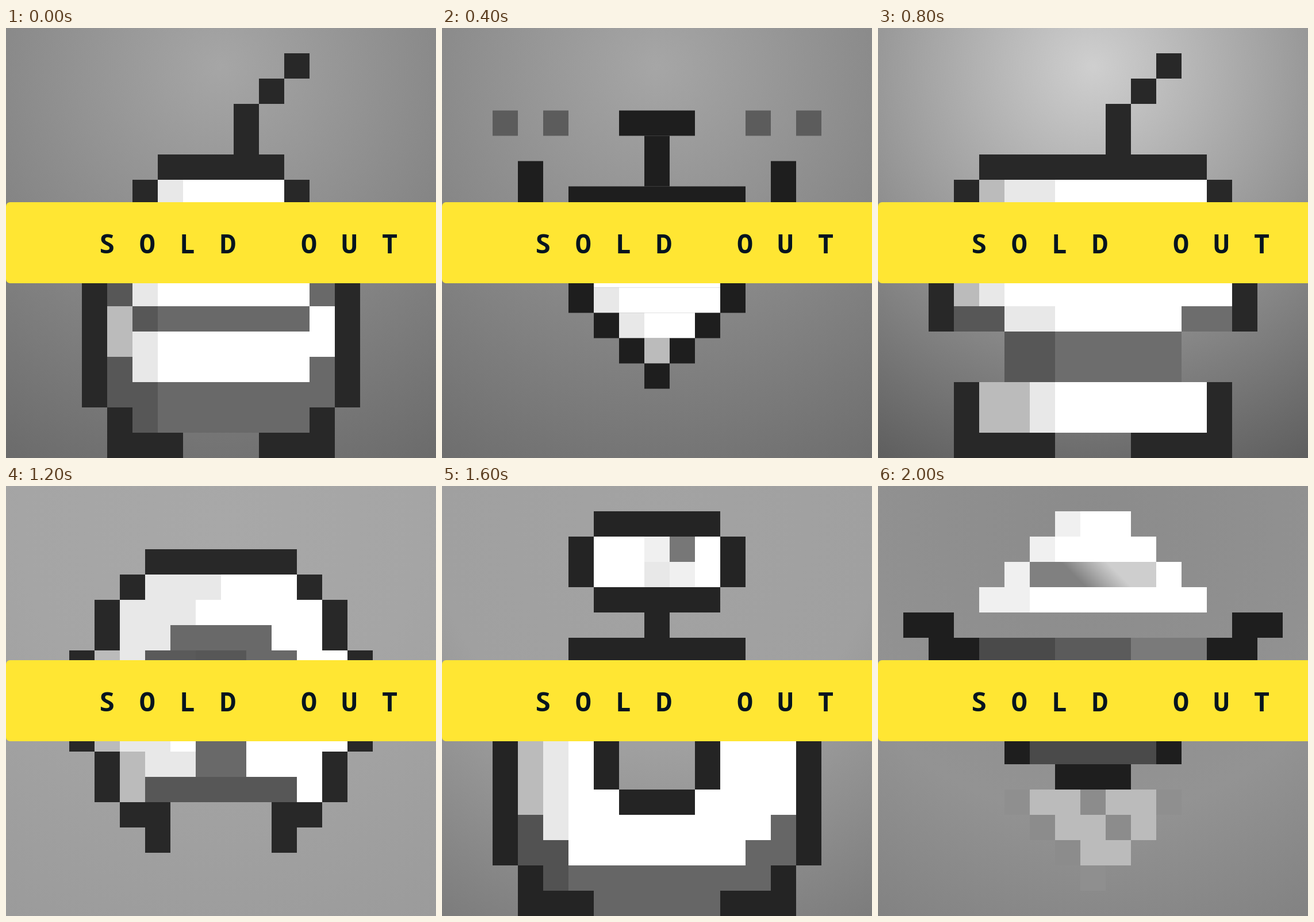
Write an HTML page with a canvas that moves like this. It is 748 by 748 pixels and loops after 2.4 s.

```html
<!DOCTYPE html>
<html lang="en">
<head>
<meta charset="utf-8">
<title>Sold out</title>
<style>
html, body { margin: 0; width: 100%; height: 100%; overflow: hidden; }
canvas { display: block; width: 748px; height: 748px; }
</style>
</head>
<body>
<canvas width="748" height="748"></canvas>
<script>
const ctx = document.querySelector('canvas').getContext('2d');
const SIZE = 748, CELL = 44, HOLD = 400;
const WHITE = '#fff', LIGHT = '#e8e8e8', PALE = '#f0f0f0', SILVER = '#bbb';
const INK = '#282828', BLACK = '#1e1e1e', SHADE = '#575757', GREY = '#696969';

let columns = 17;

function box(color, x, y, w = 1, h = 1) {
  ctx.fillStyle = color;
  ctx.fillRect(x * CELL, y * CELL, w * CELL, h * CELL);
}

// The same box on both sides of the vertical axis
function pair(color, x, y, w = 1, h = 1) {
  box(color, x, y, w, h);
  box(color, columns - x - w, y, w, h);
}

// Neighbouring runs of [color, width] from left to right
function row(x, y, h, ...runs) {
  for (const [color, w] of runs) {
    box(color, x, y, w, h);
    x += w;
  }
}

function antenna() {
  box(INK, 11, 1);
  box(INK, 10, 2);
  box(INK, 9, 3, 1, 2);
}

function fillGradient(gradient, stops) {
  stops.forEach(([at, level]) => gradient.addColorStop(at, `rgb(${level},${level},${level})`));
  return gradient;
}

function slimRobot() {
  antenna();
  box(INK, 6, 5, 5);
  pair(INK, 5, 6);
  row(6, 6, 1, [LIGHT, 1], [WHITE, 4]);
  pair(INK, 3, 10, 1, 5);
  row(4, 10, 1, [SHADE, 1], [LIGHT, 1], [WHITE, 6], [GREY, 1]);
  row(4, 11, 1, [SILVER, 1], [SHADE, 1], [GREY, 6], [WHITE, 1]);
  row(4, 12, 1, [SILVER, 1], [LIGHT, 1], [WHITE, 7]);
  row(4, 13, 1, [SHADE, 1], [LIGHT, 1], [WHITE, 6], [GREY, 1]);
  row(4, 14, 2, [SHADE, 2], [GREY, 7]);
  pair(INK, 4, 15);
  pair(INK, 4, 16, 3);
}

function drone() {
  box(BLACK, 7, 3, 3);
  box(BLACK, 8, 4, 1, 2);
  box(BLACK, 5, 6, 7);
  pair('#5c5c5c', 2, 3);
  pair('#5c5c5c', 4, 3);
  pair(BLACK, 3, 5, 1, 2);
  pair(BLACK, 5, 9, 1, 2);
  box(WHITE, 6, 9, 5);
  row(6, 10, 1, [LIGHT, 1], [WHITE, 4]);
  row(6, 11, 1, [BLACK, 1], [LIGHT, 1], [WHITE, 2], [BLACK, 1]);
  row(7, 12, 1, [BLACK, 1], [SILVER, 1], [BLACK, 1]);
  box(BLACK, 8, 13);
}

function wideRobot() {
  antenna();
  box(INK, 4, 5, 9);
  pair(INK, 3, 6);
  row(4, 6, 1, [SILVER, 1], [LIGHT, 2], [WHITE, 6]);
  pair(INK, 2, 10, 1, 2);
  row(3, 10, 1, [SILVER, 1], [LIGHT, 1], [WHITE, 9]);
  row(3, 11, 1, [SHADE, 2], [LIGHT, 2], [WHITE, 5], ['#6d6d6d', 2]);
  row(5, 12, 2, [SHADE, 2], ['#6d6d6d', 5]);
  row(3, 14, 2, [INK, 1], [SILVER, 2], [LIGHT, 1], [WHITE, 6], [INK, 1]);
  pair(INK, 3, 16, 4);
}

function roundRobot() {
  box(INK, 5, 2, 6);
  pair(INK, 4, 3);
  pair(INK, 3, 4, 1, 2);
  pair(INK, 2, 6, 1, 4);
  pair(INK, 3, 10, 1, 2);
  pair(INK, 4, 12, 2);
  pair(INK, 5, 13);
  row(5, 3, 1, [LIGHT, 3], [WHITE, 3]);
  row(4, 4, 1, [LIGHT, 3], [WHITE, 5]);
  row(4, 5, 1, [LIGHT, 2], [GREY, 4], [WHITE, 2]);
  row(3, 6, 1, [SILVER, 1], [LIGHT, 1], ['#5a5a5a', 2], [SHADE, 2], [GREY, 2], [WHITE, 2]);
  row(3, 9, 1, [SILVER, 1], [LIGHT, 2], [WHITE, 1], [GREY, 2], [WHITE, 4]);
  row(4, 10, 1, [SILVER, 1], [LIGHT, 2], [GREY, 2], [WHITE, 3]);
  row(4, 11, 1, [SILVER, 1], [SHADE, 6], [WHITE, 1]);
}

function heavyRobot() {
  const ink = '#242424', shade = '#525252', grey = '#666';
  pair(ink, 5, 2, 1, 2);
  box(ink, 6, 1, 5);
  box(ink, 6, 4, 5);
  box(ink, 8, 5);
  box(ink, 5, 6, 7);
  row(6, 2, 1, [WHITE, 2], [PALE, 1], ['#777', 1], [WHITE, 1]);
  row(6, 3, 1, [WHITE, 2], [LIGHT, 1], [PALE, 1], [WHITE, 1]);
  pair(ink, 2, 10, 1, 5);
  row(3, 10, 3, [SILVER, 1], [LIGHT, 1], [WHITE, 1]);
  box(WHITE, 11, 10, 3, 3);
  pair(ink, 6, 10, 1, 2);
  row(6, 12, 1, [WHITE, 1], [ink, 3], [WHITE, 1]);
  row(3, 13, 1, [shade, 1], [LIGHT, 1], [WHITE, 8], [grey, 1]);
  row(3, 14, 1, [shade, 2], [WHITE, 7], [grey, 2]);
  row(3, 15, 1, [ink, 1], [shade, 1], [grey, 8], [ink, 1]);
  row(3, 16, 1, [ink, 3], [grey, 5], [ink, 3]);
}

function rocketRobot() {
  const smoke = '#8c8c8c', haze = '#8f8f8f', hull = '#4a4a4a';
  const visor = fillGradient(ctx.createLinearGradient(340, 154, 380, 114),
    [[0, 128], [.6, 176], [1, 206]]);
  row(7, 1, 1, [PALE, 1], [WHITE, 2]);
  row(6, 2, 1, [PALE, 1], [WHITE, 4]);
  row(5, 3, 1, [PALE, 1], [visor, 5], [WHITE, 1]);
  row(4, 4, 1, [PALE, 2], [WHITE, 7]);
  pair(BLACK, 1, 5, 2);
  row(2, 6, 1, [BLACK, 2], [hull, 3], ['#5b5b5b', 3], ['#7a7a7a', 3], [BLACK, 2]);
  row(5, 10, 1, [BLACK, 1], [hull, 5], [BLACK, 1]);
  box(BLACK, 7, 11, 3);
  row(5, 12, 1, [haze, 1], [SILVER, 2], [smoke, 1], [SILVER, 2], [haze, 1]);
  row(6, 13, 1, [smoke, 1], [SILVER, 2], [smoke, 1], [SILVER, 1]);
  row(7, 14, 1, [smoke, 1], [SILVER, 2]);
  box(haze, 8, 15);
}

// glow: grey levels from the lamp spot to the bottom corners
const scenes = [
  { draw: slimRobot, glow: [[0, 166], [1, 107]] },
  { draw: drone, glow: [[0, 166], [1, 110]], top: 11.5 },
  { draw: wideRobot, glow: [[0, 207], [1, 94]] },
  { draw: roundRobot, glow: [[0, 168], [.45, 165], [1, 155]], columns: 16, top: 22 },
  { draw: heavyRobot, glow: [[0, 163], [.5, 160], [.65, 150], [1, 124]] },
  { draw: rocketRobot, glow: [[0, 139], [.5, 145], [.65, 147], [1, 130]] },
];

function background(glow) {
  ctx.fillStyle = fillGradient(ctx.createRadialGradient(374, 67, 0, 374, 67, 777), glow);
  ctx.fillRect(0, 0, SIZE, SIZE);
}

function banner() {
  ctx.fillStyle = '#ffe633';
  ctx.beginPath();
  ctx.roundRect(0, 303, SIZE + 20, 141, 7);
  ctx.fill();
  ctx.fillStyle = '#04141f';
  ctx.font = '600 46px "Noto Sans Mono", monospace';
  ctx.textAlign = 'center';
  [...'SOLD OUT'].forEach((letter, i) => ctx.fillText(letter, 175.5 + i * 70.3, 392));
}

function render() {
  const scene = scenes[Math.floor(performance.now() / HOLD) % scenes.length];
  background(scene.glow);
  columns = scene.columns || 17;
  ctx.save();
  ctx.translate((SIZE - columns * CELL) / 2, scene.top || 0);
  scene.draw();
  ctx.restore();
  banner();
  requestAnimationFrame(render);
}
render();
</script>
</body>
</html>
```
